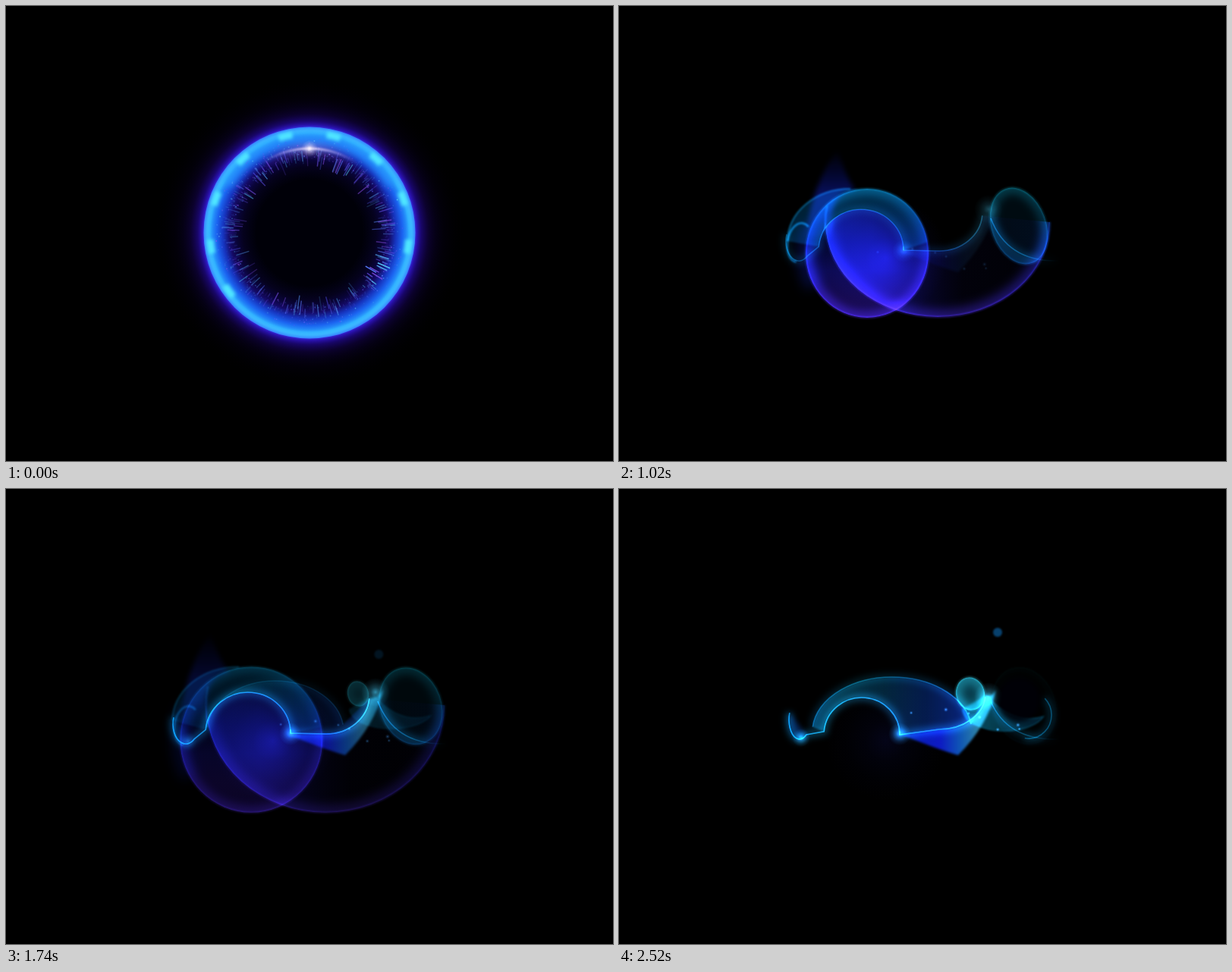
Animation of 800x600 px, one loop 2550 ms. Source, as an HTML page with a canvas:

```html
<!DOCTYPE html>
<html lang="en">
<head>
<meta charset="utf-8">
<title>Light portal</title>
<style>
html, body { margin: 0; width: 100%; height: 100%; overflow: hidden; background: #000; }
canvas { display: block; }
</style>
</head>
<body>
<canvas id="stage" width="800" height="600"></canvas>
<script>
const ctx = document.getElementById('stage').getContext('2d');
const LOOP = 2550, STEP = 30, RAD = Math.PI / 180, CX = 400, CY = 299;

const lerp = (a, b, k) => a + (b - a) * k;
const ramp = (t, from, to) => Math.max(0, Math.min(1, (t - from) / (to - from)));
const easeOut = k => 1 - (1 - k) ** 2;

function random(seed) {
  return () => (seed = (seed * 16807) % 2147483647) / 2147483647;
}

// Gradients with evenly spaced colours
function shade(gradient, colors) {
  colors.split(' ').forEach((c, i, all) => gradient.addColorStop(i / (all.length - 1), c));
  return gradient;
}
const across = (x0, x1, colors) => shade(ctx.createLinearGradient(x0, 0, x1, 0), colors);
const down = (y0, y1, colors) => shade(ctx.createLinearGradient(0, y0, 0, y1), colors);
const around = (deg, x, y, colors) => shade(ctx.createConicGradient(deg * RAD, x, y), colors);
const radial = (x, y, r0, r1, colors) => shade(ctx.createRadialGradient(x, y, r0, x, y, r1), colors);

// Joins elliptical arcs [x, y, rx, ry, from, to, tilt]; angles in degrees
function arcs(...list) {
  const path = new Path2D();
  for (const [x, y, rx, ry, from = 0, to = 360, tilt = 0] of list) {
    path.ellipse(x, y, rx, ry, tilt * RAD, from * RAD, to * RAD, to < from);
  }
  return path;
}
const circle = (x, y, r, from, to) => arcs([x, y, r, r, from, to]);
const bend = (...p) => new Path2D(`M${p.slice(0, 2)}Q${p.slice(2)}`);
const backwards = ([x, y, rx, ry, from, to]) => [x, y, rx, ry, to, from];

function paint(kind, path, style, alpha, blur, width) {
  if (alpha <= 0) return;
  ctx.save();
  ctx.globalAlpha *= Math.min(1, alpha);
  ctx.filter = blur ? `blur(${blur}px)` : 'none';
  ctx[kind + 'Style'] = style;
  ctx.lineWidth = width;
  ctx[kind](path);
  ctx.restore();
}
const fill = (path, style, alpha, blur = 0) => paint('fill', path, style, alpha, blur, 1);
const stroke = (path, style, alpha, width, blur = 0) => paint('stroke', path, style, alpha, blur, width);

function dot(x, y, r, color, alpha) {
  fill(circle(x, y, r), radial(x, y, 0, r, `${color} ${color}70 ${color}28 ${color}00`), alpha);
}

// Thin skin with light gathering inside its edge
function skin(path, body, edge, alpha) {
  ctx.save();
  ctx.clip(path);
  fill(path, body, alpha);
  stroke(path, edge, alpha * 0.5, 16, 6);
  ctx.restore();
  stroke(path, edge, alpha * 0.6, 2, 0.8);
}

function line(path, style, alpha) {
  stroke(path, style, alpha * 0.45, 9, 4);
  stroke(path, style, alpha * 0.85, 1.6, 0.6);
}

function drawSparks(t) {
  const rnd = random(4211), dim = ctx.globalAlpha;
  ctx.save();
  for (let i = 0; i < 420; i++) {
    const deg = rnd() * 360, size = rnd(), phase = rnd() * 360, hue = 195 + rnd() * 70;
    const cluster = Math.exp(-(((deg - 30) / 14) ** 2)) + 0.6 * Math.exp(-(((deg - 226) / 12) ** 2));
    const light = (0.2 + 0.4 * size * size + 0.5 * cluster) * (0.65 + 0.35 * Math.sin(phase + t / 90));
    const outer = 116 - 16 * rnd(), length = 2 + size * size * 18;
    ctx.globalAlpha = dim * Math.min(1, light);
    ctx.fillStyle = `hsl(${hue} 90% 65%)`;
    ctx.setTransform(1, 0, 0, 1, CX, CY);
    ctx.rotate(deg * RAD);
    ctx.fillRect(outer - length, 0, length, 0.8 + size * 0.7);
    ctx.rotate(phase * RAD);
    ctx.fillRect(96 + rnd() * 28, 0, 1.6, 1.6);
  }
  ctx.restore();
}

function drawRing(t) {
  const on = 1 - ramp(t, 480, 610), teal = ramp(t, 480, 600) * (1 - ramp(t, 600, 800));
  const shine = across(336, 464, '#aa8cff00 #e8e0ff #aa8cff00');
  const glint = circle(CX, CY, 111, -125, -55);
  if (on) {
    ctx.save();
    ctx.globalAlpha = on;
    fill(circle(CX, CY, 205), radial(CX, CY, 138, 205,
      '#4020ffe6 #300cd080 #2605964c #1a037030 #10004820 #0a003015 #0500180a #00000000'), 1);
    fill(circle(CX, CY, 139.5), radial(CX, CY, 70, 140,
      '#000008 #020112 #05021e #090438 #140a64 #1633bd #1b64f0 #2aa4ff #3a74ff'), 1);
    stroke(circle(CX, CY, 134.5), '#43d0ff', 0.7, 6, 2);
    stroke(circle(CX, CY, 125, -150, -30), '#2aa0ff', 0.55, 14, 5);
    for (let i = 0; i < 9; i++) {
      const deg = i * 28 - 216 + t * 0.042;
      stroke(circle(CX, CY, 131, deg - 4, deg + 4), '#58f4ff', 0.8, 9, 2);
    }
    drawSparks(t);
    stroke(glint, shine, 0.9, 3, 1);
    stroke(glint, shine, 0.4, 12, 5);
    dot(CX, 188, 11, '#fff5ff', 1);
    ctx.restore();
  }
  const ring = circle(CX, CY, 131);
  stroke(ring, '#1530b0', teal * 0.5, 22, 7);
  stroke(ring, '#108098', teal * 0.8, 12, 4);
  stroke(circle(CX, CY, 115), '#22105c', teal * 0.6, 14, 6);
  stroke(glint, shine, teal * 0.3, 14, 5);
}

function drawSwirl(t) {
  const turn = ramp(t, 330, 600);
  const x = lerp(407, 401, turn), y = lerp(295, 300, turn);
  const disc = circle(x, y, 76 + 28 * easeOut(ramp(t, 0, 600)));
  fill(disc, '#000008', ramp(t, 60, 330) * (1 - ramp(t, 600, 700)), 2);
  ctx.save();
  ctx.globalCompositeOperation = 'lighter';
  ctx.globalAlpha = ramp(t, 10, 330) * (1 - ramp(t, 640, 880));

  ctx.save();
  ctx.clip(disc);
  fill(circle(402, 300, 92), around(-90, 402, 300,
    '#000006 #080530 #1d1278 #140d60 #0c0950 #0a1c80 #082a88 #020824 #000006'), lerp(0.9, 0.65, turn), 9);
  stroke(circle(402, 303, 48, 25, 205), '#2144f0', 0.85, 20, 9);
  stroke(circle(401, 304, 52, 40, 150), '#355cff', 0.6, 9, 5);
  ctx.restore();

  const rim = around(lerp(120, 315, turn), x, y,
    '#805cff #642eea #2c20a8 #1c1480 #151060 #201a90 #2f28b8 #5038e8 #805cff');
  stroke(disc, rim, 0.6, lerp(10, 6, turn), 4);
  stroke(disc, rim, 0.95, lerp(5, 2.5, turn), lerp(1.8, 0.7, turn));

  // Hollow core
  ctx.globalCompositeOperation = 'source-over';
  fill(circle(403, 300, 33), '#00060f', 0.88, 4);
  ctx.globalCompositeOperation = 'lighter';
  const core = around(0, 401, 299, '#28209600 #1838b8 #3c64ff #7460ff #28209600');
  stroke(circle(401, 299, 35), core, 0.9, 4, 1.8);
  stroke(circle(401, 299, 37), core, 0.5, 11, 5);
  stroke(circle(404, 297, 18, 30, 200), '#063f66', 0.6, 12, 5);

  // Arm: the gap between two off-centre ovals
  const sweep = ramp(t, 380, 600);
  ctx.translate(401, 300);
  ctx.rotate((t - 600) * 0.09 * RAD);
  ctx.translate(-401, -300);
  const arm = arcs([446, 303, 61, 57]);
  arm.addPath(arcs([434, 308, 43, 33, 360, 0]));
  fill(arm, around(168, 440, 303, '#e0e0ff #8050f8 #3c1ab8 #281290 #3028c8 #2424a0a0 #10108030 #10108000 #10108000'), sweep * 0.9, 5);
  stroke(arcs([434, 306, 46, 36, 172, 215]), '#e4e4ff', sweep, 7, 2.5);
  ctx.restore();
}

function drawShells(alpha, k, cap, inner, valley) {
  const left = [lerp(327, 323, k), lerp(326, 331, k), lerp(81, 95, k), lerp(85, 97, k)];
  const bowl = [lerp(420, 421, k), 285, lerp(148, 158, k), lerp(125, 143, k)];
  const edge = down(235, 425, '#0a7090 #0a4a90 #1428b0 #3028c8 #3a24c8 #4628c0');

  fill(arcs(cap, [...left, 265, 350], backwards(inner)), '#004a78', alpha * 0.45, 1);
  skin(arcs(left), down(235, 425, '#00304830 #00184848 #060e6a70 #16129090 #28128c90 #2a109080'), edge, alpha);

  ctx.save();
  ctx.clip(arcs([...bowl, 180, 0], backwards(valley), backwards(inner)));
  fill(arcs(bowl), across(272, 575, '#1822ccb0 #181cb890 #14108060 #08063038 #08063028 #0a0a5030'), alpha);
  stroke(arcs(bowl), edge, alpha * 0.5, 18, 7);
  ctx.restore();
  stroke(arcs([...bowl, 190, 0]), edge, alpha * 0.6, 2, 0.8);

  // Rising haze where both left edges run on upwards
  const tip = lerp(288, 268, k), foot = left[0] - left[2];
  const haze = new Path2D(`M${tip},190Q${foot + 8},235 ${foot},305L${foot + 35},305Q${foot + 28},245 ${foot + 65},242Q${tip + 12},228 ${tip},190`);
  fill(haze, down(190, 310, '#0a10a000 #0a149060 #1222c0a0 #1424c890 #1020a000'), alpha * 0.8, 3);
  stroke(arcs([...left, 150, 205]), '#1226c8', alpha * 0.3, 22, 8);
}

function drawRibbons(t) {
  const shown = ramp(t, 660, 980);
  if (!shown) return;
  const k = easeOut(ramp(t, 1020, 2010)), m = ramp(t, 2010, 2520);
  const low = 1 - ramp(t, 1200, 2300), high = ramp(t, 1500, 2150);
  const river = 0.1 + 0.85 * ramp(t, 1100, 2150), thread = 0.4 + 0.5 * ramp(t, 1020, 2010);

  ctx.save();
  ctx.globalCompositeOperation = 'lighter';
  ctx.globalAlpha = shown;
  const unwind = 1 - easeOut(ramp(t, 660, 1020));
  ctx.translate(400, 310);
  ctx.rotate(-0.35 * unwind);
  ctx.scale(1 - 0.28 * unwind, 1 - 0.28 * unwind);
  ctx.translate(-400, -310);

  const cap = [lerp(305, 307, k), lerp(310, 305, k), lerp(83, 88, k), lerp(69, 71, k), 180, 270];
  const inner = [lerp(319, 320, m), lerp(322, 324, m), lerp(56, 50, m), lerp(54, 49, m), 185, 360];
  const valley = [422, lerp(272, 270, m), lerp(57, 61, m), lerp(51, 47, m), 90, 5];
  const hook = [lerp(237, 238, m), lerp(310, 304, m), lerp(17, 14, m), 26, 200, 50];
  const arch = [lerp(355, 360, m), 320, lerp(90, 105, m), lerp(67, 72, m), 185, 352];

  if (low) {
    drawShells(low, k, cap, inner, valley);
    stroke(arcs(cap), '#0a6a98', low * 0.7, 2, 0.8);
    stroke(arcs([238, 312, 16, 26, 90, 300, 10]), '#0c80c8', low * 0.7, 2.5, 1);
  }
  dot(352, 332, 80, '#1a1ca0', 0.5 * (1 - 0.7 * m));

  const lens = arcs([lerp(527, 534, k), lerp(290, 286, k), lerp(36, 41, k), 52, 0, 360, -20]);
  skin(lens, '#00283c60', down(236, 340, '#0a8496 #085a80 #0a58a4'), 0.75 - 0.25 * k - 0.45 * m);
  line(bend(490, 280, 512, 338 - 6 * m, 580, 336 - 6 * m), across(488, 580, '#1684e0 #1080b0 #003c6400'), 0.5);
  line(arcs([540, 298, 30, 31, -45, 100]), '#0a6088', m * 0.7);

  // Upper band
  fill(arcs(arch, backwards(valley), backwards(inner)), across(240, 460, '#0874b8 #075878 #064468 #083088 #1040e0'), high * 0.55, 1);
  line(arcs(arch), across(245, 460, '#0a70b8 #0a7898 #0a68a0 #1c90f0'), high * 0.6);

  // Water between the valley and its lower bank
  const water = arcs(valley);
  water.quadraticCurveTo(490, 276, 497, 265);
  water.quadraticCurveTo(486, 312, 447, 351);
  water.quadraticCurveTo(425, 345, 372, 324);
  fill(water, across(372, 500, '#0c40c8 #0a22dc #1020f0 #1268e0 #3aa4cc #1080b0'), river * 0.85, 1.5);

  const loop = arcs([lerp(464, 463, m), 270, lerp(14, 19, m), lerp(17, 22, m), 0, 360, -14]);
  skin(loop, '#08485c', '#2ca0b0', high * 0.8);
  const skirt = arcs([508, 290, 55, lerp(26, 29, m), 180, 20]);
  skirt.quadraticCurveTo(520, 312, 484, 272);
  fill(skirt, across(450, 560, '#0a78b0 #0a7898 #064868 #053050'), high * 0.55, 1.5);
  stroke(skirt, '#0a80a8', high * 0.35, 1.5, 0.8);

  const glow = across(220, 580, '#0b90d8 #18a0d8 #1c90d0 #1880e0 #1878f0 #30b0e0 #1098d0 #0a6ca0');
  line(arcs(hook, inner), glow, thread);
  line(arcs([...inner.slice(0, 4), 355, 360], valley), glow, thread);
  fill(arcs(hook), '#08327c', high * 0.6, 3);
  dot(inner[0] + inner[2], 323, 15, '#2896ff', thread);
  dot(487, lerp(268, 274, m), 19, '#3cb4dc', thread);
  dot(240, lerp(333, 328, m), 12, '#28a8f0', thread * high);

  // Dark opening in the right loop
  ctx.globalCompositeOperation = 'source-over';
  fill(arcs([527, 278, 28, 29]), '#000008', m * 0.85, 3);
  ctx.globalCompositeOperation = 'lighter';

  const rnd = random(77), drift = (t - 2010) / 510;
  fill(circle(494 + 5 * drift, 208 - 19 * drift, 6), '#07406c', ramp(t, 1620, 2010), 0.8);
  for (let i = 0; i < 7; i++) {
    const x = 370 + 145 * rnd() + 15 * drift, y = 300 + 40 * rnd() - 10 * drift;
    dot(x, y, 2.4 + rnd(), '#46a5ff', 0.2 + 0.7 * high);
  }
  ctx.restore();
}

function draw(t) {
  ctx.fillStyle = '#000';
  ctx.fillRect(0, 0, 800, 600);
  drawRing(t);
  drawSwirl(t);
  drawRibbons(t);
}

function tick(now) {
  draw(Math.floor(now % LOOP / STEP) * STEP);
  requestAnimationFrame(tick);
}
requestAnimationFrame(tick);
</script>
</body>
</html>
```
